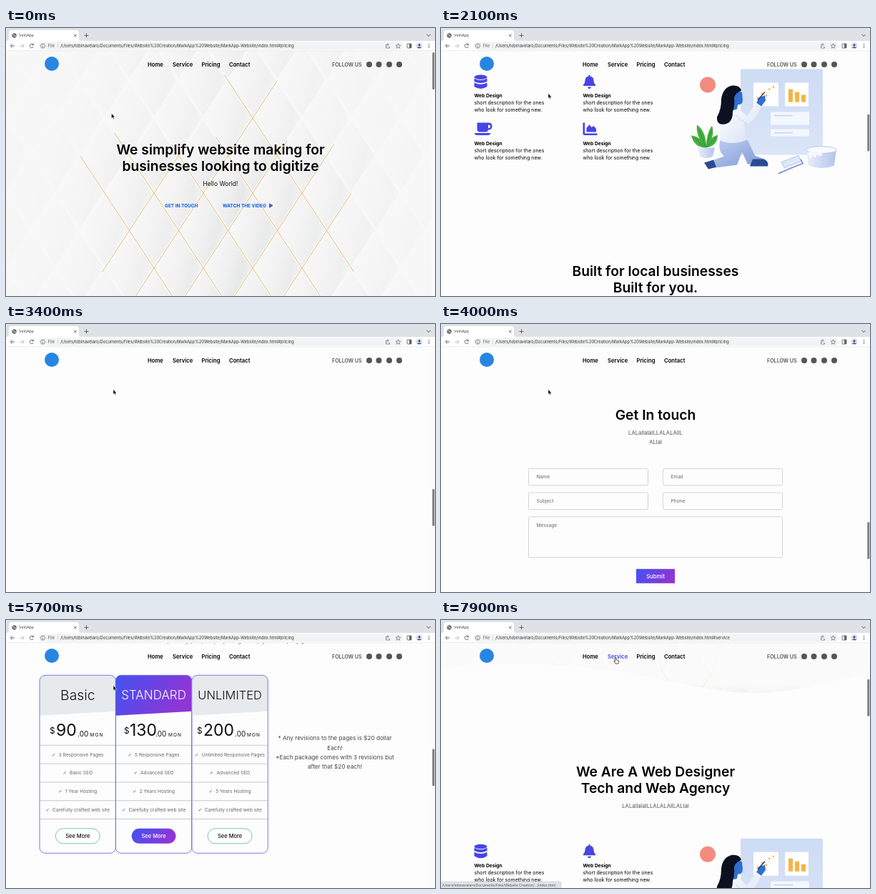
An HTML page that plays this animation: 600 px wide and 375 px high, repeating every 8 s.

```html
<!DOCTYPE html>
<html lang="en">
<head>
<meta charset="utf-8">
<title>Website walkthrough</title>
<style>
  html, body { margin: 0; width: 100%; height: 100%; overflow: hidden; background: #fdfdfd; }
  svg { display: block; width: 100vw; height: 100vh; }
  text { font-family: Inter, "Open Sans", sans-serif; white-space: pre; }
</style>
</head>
<body>
<svg id="stage" viewBox="0 0 600 375"></svg>
<script>
const LOOP = 8000;
const INDIGO = '#4845e6';

// ---------- drawing helpers; text is placed by the middle of its capitals ----------
const text = (x, y, size, str, { w = 400, c = '#111', a = 'start', more = '' } = {}) =>
  `<text x="${x}" y="${y + size * 0.36}" font-size="${size}" font-weight="${w}" fill="${c}" text-anchor="${a}" ${more}>${str}</text>`;
const centred = (x, y, size, str, opts) => text(x, y, size, str, { a: 'middle', ...opts });
const rect = (x, y, w, h, fill, rx = 0, more = '') =>
  `<rect x="${x}" y="${y}" width="${w}" height="${h}" rx="${rx}" fill="${fill}" ${more}/>`;
const circle = (x, y, r, fill, more = '') => `<circle cx="${x}" cy="${y}" r="${r}" fill="${fill}" ${more}/>`;
const path = (d, fill, more = '') => `<path d="${d}" fill="${fill}" ${more}/>`;
const line = (d, stroke, width = 1, more = '') =>
  `<path d="${d}" fill="none" stroke="${stroke}" stroke-width="${width}" ${more}/>`;
const at = (x, y, content, more = '') => `<g transform="translate(${x} ${y})" ${more}>${content}</g>`;
const range = (from, to) => Array.from({ length: to - from + 1 }, (_, k) => from + k);
const heading = (y, str) => centred(300, y, 19.3, str, { w: 600, c: '#000' });

const gradient = (id, dir, stops) => `<linearGradient id="${id}" ${dir}>` +
  stops.map(([o, c, alpha = 1]) => `<stop offset="${o}" stop-color="${c}" stop-opacity="${alpha}"/>`).join('') +
  '</linearGradient>';

const defs = `<defs>
  ${gradient('tile', 'x1="0" y1=".3" x2="1" y2=".7"', [[0.1, '#f7f7f7'], [0.5, '#f0f0f0'], [0.75, '#e7e8e9'], [1, '#f0f0f0']])}
  ${gradient('wash', 'x1="0" y1="0" x2="0" y2="1"', [[0, '#fcfcfc', 0.8], [0.85, '#fcfcfc', 0.75], [1, '#fcfcfc', 0]])}
  ${gradient('violet', 'x1="0" y1="0" x2="1" y2="0.3"', [[0, '#4252f1'], [1, '#9035d6']])}
  ${gradient('board', 'x1="0" y1="0" x2="0" y2="1"', [[0, '#cddbf4'], [1, '#dbe5f8']])}
  ${gradient('shirt', 'x1="0" y1="0" x2="1" y2="1"', [[0, '#ffffff'], [1, '#d5dff4']])}
  ${gradient('jeans', 'x1="0" y1="0" x2="1" y2="1"', [[0, '#c9d6f3'], [1, '#7b96d6']])}
  ${gradient('tin', 'x1="0" y1="0" x2="1" y2="0"', [[0, '#e9effb'], [1, '#b3c3e9']])}
  <clipPath id="page"><rect y="32" width="595" height="343"/></clipPath>
</defs>`;

// ---------- hero: the wallpaper stays put while the page scrolls over it ----------
const node = (i, j) => `${345 + 34.5 * i} ${126 + 52.5 * j}`;

function wallpaper() {
  let out = rect(0, 32, 600, 343, '#f8f8f8');
  for (const j of range(-2, 6)) for (const i of range(-10, 8)) {
    if ((i + j) % 2 === 0) continue;
    const fade = Math.max(0.15, 1 - Math.abs(i + 1) / 9) * (j < 1 ? 0.6 : 1);
    out += path(`M${node(i, j - 0.94)}L${node(i + 0.94, j)}L${node(i, j + 0.94)}L${node(i - 0.94, j)}Z`,
      'url(#tile)', `opacity="${fade.toFixed(2)}"`);
  }
  const gold = [
    [-1.15, -1.15, 4.1, 4.1], [-1.5, 0.5, 3, 5], [-3.3, 0.7, 1, 5], [-5.6, 0.4, -1, 5], [-7, 1, -3, 5],
    [1, -1, -5, 5], [-2.7, 0.7, -6.1, 4.1], [1.4, 0.6, -3, 5], [3.3, 0.7, -1, 5], [4, 2, 1, 5],
  ];
  return out + line(gold.map(([a, b, c, d]) => `M${node(a, b)}L${node(c, d)}`).join(''), '#e2b768', 0.85);
}

const hero = () =>
  path('M0 390C60 383 120 382 170 386C260 392 320 410 390 421C470 432 540 412 600 395V2200H0Z', '#fdfdfd') +
  heading(170, 'We simplify website making for') + heading(193, 'businesses looking to digitize') +
  centred(300, 217.5, 8.5, 'Hello World!') +
  text(222, 248.5, 6.5, 'GET IN TOUCH', { w: 700, c: '#0b5cea' }) +
  text(303, 248.5, 6.5, 'WATCH THE VIDEO', { w: 700, c: '#0b5cea' }) +
  path('M368.5 245.8L373 248.5L368.5 251.2Z', '#4a57e0', 'stroke="#4a57e0" stroke-linejoin="round"');

// ---------- services ----------
const icons = {
  database: `<ellipse cx="9" cy="3.2" rx="9" ry="3.2"/>
    <path d="M0 5Q9 10 18 5V9.300Q9 13.500 0 9.300ZM0 11Q9 15.500 18 11V16.500Q9 22.500 0 16.500Z"/>`,
  bell: `<path d="M9 0Q10.200 0 10.200 2Q15 3.200 15 8Q15 12 17.500 14V15.500H.5V14Q3 12 3 8Q3 3.200 7.800 2Q7.800 0 9 0ZM6.500 17H11.500Q11 19.500 9 19.500Q7 19.500 6.500 17Z"/>`,
  cup: `<path d="M4 0H20Q25 0 25 5Q25 10 19.500 10Q19 13 16 13H8Q4 13 4 9ZM19.500 3V7.500Q22.500 7.500 22.500 5.200Q22.500 3 19.500 3ZM0 14.500H23Q22 17.500 19 17.500H4Q1 17.500 0 14.500Z" fill-rule="evenodd"/>`,
  chart: `<path d="M0 0H2.600V15H20V17.500H2Q0 17.500 0 15.500ZM5 13V7.500L9 2.500L12 6.500L15 4.500L18.500 8.500V13Z"/>`,
};

const service = (x, y, icon) => at(x, y, icons[icon], `fill="${INDIGO}"`) +
  text(x, y + 29.5, 6.7, 'Web Design', { w: 700, c: '#000' }) +
  text(x, y + 39.3, 7, 'short description for the ones', { c: '#000' }) +
  text(x, y + 49.3, 7, 'who look for something new.', { c: '#000' });

function illustration() {
  const bar = (x, h) => rect(x, 104 - h, 6, h, '#f6b545');
  const row = (y, h) => rect(461, y, 54, h, '#f3f7fe', 1) + line(`M466 ${y + 5}H492`, '#c3d2f0', 1.5);
  return circle(373, 80, 11, '#f48b80') +
    rect(419, 58, 115, 120, 'url(#board)', 2) +
    rect(437, 77, 35, 33, '#fff', 1) + rect(481, 77, 33, 33, '#fff', 1) +
    line('M442 100L448 93L454 95L465 83', '#dfe5f3', 0.8) +
    [[443, 98], [449, 92], [455, 95], [459, 86], [465, 83]].map(([x, y]) => circle(x, y, 1.3, '#f6b545')).join('') +
    bar(486, 18) + bar(495, 14) + bar(504, 10) + row(118, 18) + row(142, 10) +
    // plant
    path('M369 168Q354 167 350 151Q364 152 369 168Q356 150 358 136Q371 145 371 168Q371 148 379 137Q384 152 371 168Q374 154 387 150Q387 165 371 168Z', '#45b03c') +
    line('M369 168L355 154M370 167L361 143M371 167L378 143M371 168L384 154', '#257c3c', 0.7) +
    path('M359 168H383L380 180Q371 185 362 180Z', 'url(#tin)') +
    // kneeling designer
    path('M391 155Q386 172 396 180L373 188L376 197L414 192L421 174L429 191H446L452 184L439 179L429 158Q408 148 391 155Z', 'url(#jeans)') +
    path('M368 189L374 198L385 195L381 185ZM436 184H452Q459 188 457 194H432Z', '#2b4a94') +
    path('M389 136Q390 118 404 113L415 112Q424 120 428 124L440 106L448 110Q438 132 428 135L424 132L426 158Q406 165 391 158Z', 'url(#shirt)') +
    line('M412 122Q418 130 428 134', '#c3d0ec', 0.9) +
    path('M409 90Q417 86 421 91L422 101Q422 108 415 108L414 114Q408 117 405 112Z', '#2f6fd2') +
    path('M441 105L446 97L453 95L454 102L448 110Z', '#2f6fd2') + line('M443 101L453 90', '#1b2a55', 1.3) +
    path('M420 88Q418 80 407 81Q394 84 392 100Q392 115 386 125Q385 137 397 135Q408 133 408 118Q411 108 410 98Q412 91 420 88Z', '#0d1020') +
    // roller and bucket
    path('M476 188L500 179L504 187L480 196Z', '#dfe7f8', 'stroke="#a3b6e2" stroke-width=".8"') +
    line('M503 184L506 190L488 197L472 204', '#7f98d3', 1.8) +
    path('M511 171H553L550 193Q532 200 514 193Z', 'url(#tin)') +
    `<ellipse cx="532" cy="171" rx="21" ry="5" fill="#f8faff" stroke="#aabbe2" stroke-width=".8"/>` +
    path('M513 174Q517 190 520 177Q523 186 526 177Q530 183 534 176Z', '#f8faff');
}

const services = () => heading(534, 'We Are A Web Designer') + heading(557, 'Tech and Web Agency') +
  centred(300, 582, 7.7, 'LALallalalLLALALAllLALlal', { c: '#555' }) +
  service(46.5, 636, 'database') + service(198.5, 636, 'bell') +
  service(46.5, 703, 'cup') + service(198.5, 703, 'chart') + at(0, 570, illustration());

// ---------- pricing ----------
const plans = [
  { x: 47, name: 'Basic', size: 19.3, price: '90', cols: [61, 70, 100, 117.5], pages: '3 Responsive', seo: 'Basic', years: '1 Year' },
  { x: 153.3, name: 'STANDARD', size: 17, price: '130', cols: [165, 173, 209, 227], pages: '5 Responsive', seo: 'Advanced', years: '2 Years', strong: true },
  { x: 259.8, name: 'UNLIMITED', size: 16.5, price: '200', cols: [267, 276, 320, 337], pages: 'Unlimited Responsive', seo: 'Advanced', years: '5 Years' },
];

function planCard({ x, name, size, price, cols, pages, seo, years, strong }) {
  const mid = x + 53.3, top = 65.5;
  const tick = `<tspan font-family="DejaVu Sans, sans-serif" fill="${INDIGO}" font-weight="700">✓</tspan><tspan dx="4">`;
  const rows = [`${pages} Pages`, `${seo} SEO`, `${years} Hosting`, 'Carefully crafted web site'];
  return path(`M${x} 122V${top + 8}Q${x} ${top} ${x + 8} ${top}H${x + 98.5}Q${x + 106.5} ${top} ${x + 106.5} ${top + 8}V116Z`,
      strong ? 'url(#violet)' : '#e6eaec') +
    centred(mid, 93.5, size, name, { w: 300, c: strong ? '#fff' : '#111' }) +
    text(cols[0], 142.5, 12, '$') + text(cols[1], 142.3, 23, price) +
    text(cols[2], 147.4, 10, '.00') + text(cols[3], 148.7, 6.5, 'MON', { more: 'letter-spacing="1.1"' }) +
    rows.map((row, k) => line(`M${x} ${163.5 + 25.8 * k}h106.500`, '#b9bcc4', 0.8) +
      centred(mid, 176.5 + 25.8 * k, 6.6, `${tick}${row}</tspan>`, { c: '#666' })).join('') +
    line(`M${x} 266.700h106.500`, '#b9bcc4', 0.8) +
    rect(mid - 31, 280, 62, 21, strong ? 'url(#violet)' : '#fff', 10.5, strong ? '' : 'stroke="#55bd8c" stroke-width=".8"') +
    centred(mid, 290.5, 7.5, 'See More', { w: 500, c: strong ? '#fff' : '#111' }) +
    rect(x, top, 106.5, 249, 'none', 8, 'stroke="#6470e2" stroke-width=".9"');
}

const notes = ['* Any revisions to the pages is $20 dollar', 'Each!', '*Each package comes with 3 revisions but', 'after that $20 each!'];

const pricing = () => heading(910, 'Built for local businesses') + heading(933, 'Built for you.') +
  centred(328, 994, 7.7, 'pick any plan, simple pricing to help your company grow', { c: '#555' }) +
  at(0, 977, plans.map(planCard).join('') +
    notes.map((str, k) => centred(460, 153.5 + 13.4 * k, 8.2, str, { c: '#444' })).join(''));

// ---------- contact ----------
const field = (x, y, w, h, label, size = 6.7) =>
  rect(x, y, w, h, '#fdfdfd', 2, 'stroke="#c9c9cb" stroke-width=".8"') + text(x + 11, y + 11.7, size, label, { c: '#666' });

const contact = () => at(0, 1604, heading(127.5, 'Get In touch') +
  centred(300, 152.5, 7.7, 'LALallalalLLALALAllL', { c: '#555' }) +
  centred(300, 165.5, 7.7, 'ALlal', { c: '#555' }) +
  field(122.5, 202.5, 167, 23.5, 'Name') + field(310.5, 202.5, 167, 23.5, 'Email') +
  field(122.5, 236.3, 167, 23.5, 'Subject') + field(310.5, 236.3, 167, 23.5, 'Phone') +
  field(122.5, 270, 355, 57, 'Message') +
  rect(273, 343, 54, 20, 'url(#violet)') + centred(300, 353, 7.7, 'Submit', { w: 500, c: '#fff' }));

// ---------- fixed site header and browser window ----------
const siteHeader = () => circle(64, 50, 10, '#2686e2') +
  [['Home', 198], ['Service', 233], ['Pricing', 273.5], ['Contact', 312]].map(([label, x]) =>
    text(x, 51, 7.7, label, { w: 600, c: '#000', more: `id="nav${label}"` })).join('') +
  text(456, 51, 7.1, 'FOLLOW US', { w: 600, c: '#555' }) +
  [508, 521.5, 536, 550].map(x => circle(x, 51, 4, '#555')).join('');

const browser = () => rect(0, 0, 600, 18, '#dee1e6') +
  path('M1 18Q4 18 4 15V7Q4 3 8 3H98Q102 3 102 7V15Q102 18 105 18Z', '#fff') +
  circle(11.5, 10.5, 3.2, '#5f6368') + line('M9 9.500Q11 8 12 10T14 12M10 12.500L11.500 11', '#fff', 0.8) +
  text(18, 10.5, 5.3, 'VelnApp', { c: '#444' }) +
  line('M95 8.700L98.600 12.300M98.600 8.700L95 12.300M109.500 10.500H115.500M112.500 7.500V13.500', '#444', 0.8) +
  line('M588.500 9L591 11.500L593.500 9', '#444', 0.9) +
  rect(0, 18, 600, 14, '#fff') + rect(0, 31.6, 600, 0.6, '#dcdee1') +
  line('M12 25H6.500M9 22.300L6.300 25L9 27.700', '#55585c', 0.9) +
  line('M19.500 25H25M22.500 22.300L25.200 25L22.500 27.700', '#b0b3b7', 0.9) +
  line('M38 23.200A2.700 2.700 0 1 0 38.400 26M38.400 21.800V23.800H36.300', '#55585c', 0.9) +
  rect(45, 19.5, 511, 11, '#f1f3f4', 5.5) +
  line('M51.500 24.800V27M51.500 23V23.700M54.500 25A3 3 0 1 0 48.500 25A3 3 0 1 0 54.500 25', '#5f6368', 0.7) +
  text(58.5, 25, 5.8, 'File', { c: '#5f6368' }) + rect(72, 22, 0.5, 6, '#b9bcc0') +
  text(76, 25, 5.78, '', { c: '#333', more: 'id="address"' }) +
  line('M533 23.500H531.500V28H536.500V26M534 26V22.200M532.300 23.500L534 21.800L535.700 23.500', '#5f6368', 0.7) +
  path('M548.500 21.800L549.500 24L551.800 24.200L550 25.800L550.600 28.200L548.500 27L546.400 28.200L547 25.800L545.200 24.200L547.500 24Z', 'none', 'stroke="#5f6368" stroke-width=".7"') +
  rect(561, 22, 6, 6, 'none', 0.8, 'stroke="#5f6368" stroke-width=".9"') + rect(564, 22, 3, 6, '#5f6368') +
  circle(578, 25, 4.6, '#d4dcec') + circle(578, 23.8, 1.5, '#344a75') + path('M575 28Q578 24.500 581 28Z', '#344a75') +
  [22.7, 25, 27.3].map(y => circle(591.5, y, 0.7, '#55585c')).join('');

const folder = '/Users/tobinavelaro/Documents/Files/';
const address = anchor => `${folder}Website%20Creation/MarkApp%20Website/MarkApp-Website/index.html#${anchor}`;

const statusBar = () => rect(-2, 366, 170, 11, '#dfe2e7', 2, 'stroke="#c5c8cd" stroke-width=".5"') +
  text(1.5, 371, 4.9, `${folder}Website Creation/.../index.html`, { c: '#555' });

const arrow = path('M0 0V7L1.600 5.600L2.700 8L3.800 7.500L2.700 5.200H4.800Z', '#000', 'stroke="#fff" stroke-width=".5"');
const hand = path('M-1 0Q0 -1 .8 0V3L3.500 3.600Q4.500 4 4.300 5L3.600 8H-.5L-2.800 4.800Q-2.500 3.700 -1 5Z', '#fff', 'stroke="#111" stroke-width=".7"');

const stage = document.getElementById('stage');
stage.innerHTML = defs + rect(0, 0, 600, 375, '#fdfdfd') +
  `<g clip-path="url(#page)">${wallpaper()}${rect(0, 32, 600, 68, 'url(#wash)', 0, 'id="wash-band"')}` +
  `<g id="content">${hero()}${services()}${pricing()}${contact()}</g></g>` +
  siteHeader() + rect(595, 32, 5, 343, '#fafafa') + rect(596.3, 34, 3, 52, '#7d7d7d', 1.5, 'id="thumb"') +
  browser() + `<g id="status">${statusBar()}</g>` +
  `<g id="cursor"><g id="arrow">${arrow}</g><g id="hand">${hand}</g></g>`;

// ---------- motion ----------
const scrollKeys = [[0, 0], [150, 0], [800, 103], [2100, 570], [2900, 977], [4000, 1604], [4500, 1680],
  [4700, 1660], [5700, 966], [6700, 0], [7350, 0], [7900, 322], [8000, 338]];
const cursorX = [[0, 147.5], [300, 150], [6700, 150], [7150, 244.5], [8000, 244.5]];
const cursorY = [[0, 119.5], [300, 91.5], [6700, 91.5], [7150, 53], [8000, 53]];

// Hermite curve through the keys, flat wherever the direction turns.
function follow(keys, t) {
  const slope = k => (keys[k + 1][1] - keys[k][1]) / (keys[k + 1][0] - keys[k][0]);
  const tangent = k => {
    if (k === 0 || k === keys.length - 1) return 0;
    const a = slope(k - 1), b = slope(k);
    return a * b <= 0 ? 0 : 2 * a * b / (a + b);
  };
  let k = 0;
  while (k < keys.length - 2 && t >= keys[k + 1][0]) k++;
  const [t0, v0] = keys[k], [t1, v1] = keys[k + 1];
  const span = t1 - t0, u = (t - t0) / span, r = 1 - u;
  return v0 * (1 + 2 * u) * r * r + tangent(k) * span * u * r * r +
    v1 * u * u * (3 - 2 * u) - tangent(k + 1) * span * u * u * r;
}

const el = id => document.getElementById(id);
const show = (id, on) => el(id).setAttribute('visibility', on ? 'visible' : 'hidden');

function render(t) {
  const scroll = follow(scrollKeys, t);
  const hover = t >= 7080;
  el('content').setAttribute('transform', `translate(0 ${-scroll})`);
  el('wash-band').setAttribute('opacity', Math.min(1, scroll / 60));
  el('thumb').setAttribute('y', 34 + scroll / 6.6);
  el('cursor').setAttribute('transform', `translate(${follow(cursorX, t)} ${follow(cursorY, t)})`);
  el('navService').setAttribute('fill', hover ? INDIGO : '#000');
  el('address').textContent = address(t >= 7350 ? 'service' : 'pricing');
  show('status', hover);
  show('hand', hover);
  show('arrow', !hover);
}

const start = performance.now();
function tick() {
  render((performance.now() - start) % LOOP);
  requestAnimationFrame(tick);
}
tick();
</script>
</body>
</html>
```
